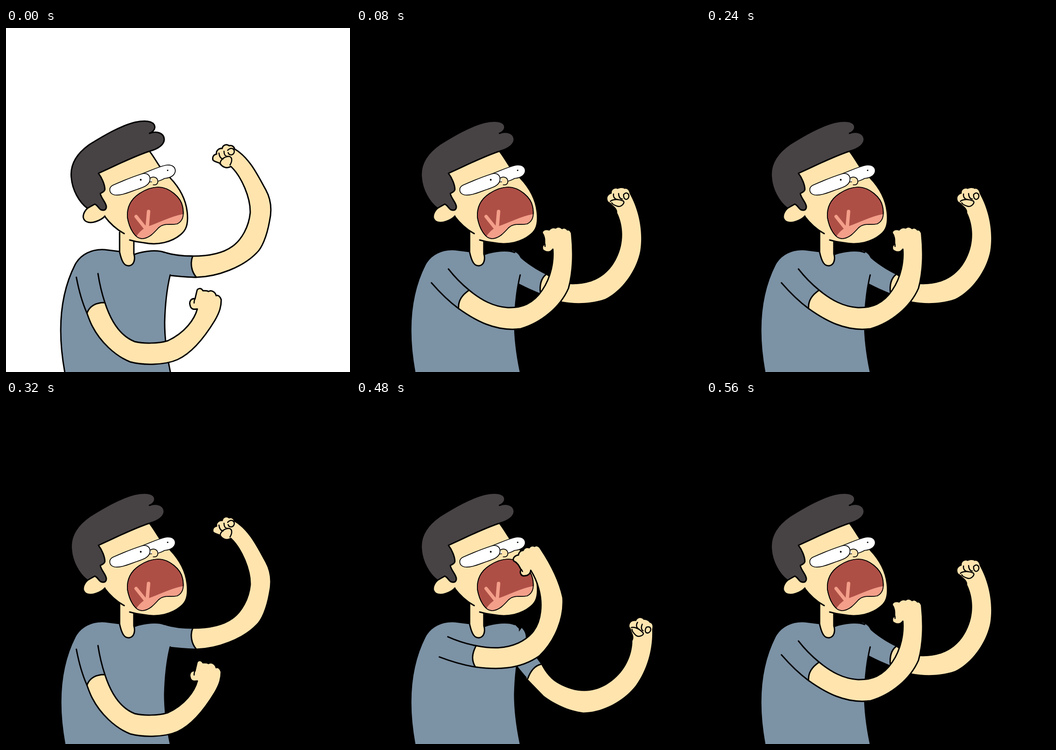
These frames come from a looping animation (748x748 px, 640 ms). An HTML page:

```html
<!DOCTYPE html>
<html lang="en">
<head>
<meta charset="utf-8">
<title>Shouting and punching</title>
<style>
  html, body { margin: 0; width: 100%; height: 100%; overflow: hidden; background: #fff; }
  svg { display: block; width: 100vw; height: 100vh; }
  path { stroke: #000; stroke-width: 3; stroke-linecap: round; stroke-linejoin: round; fill: none; }
  .skin { fill: #ffe4ae; }
  .shirt { fill: #7c92a5; }
  .hair { fill: #474244; }
  .white { fill: #fff; }
  .mouth { fill: #ae4f46; }
  .tongue { fill: #f39f8a; }
  .thin { stroke-width: 1.7; }
  .plain { stroke: none; }
  .fold { stroke: #f39f8a; stroke-width: 7.5; }
  .knuckles { stroke-width: 2.5; }
</style>
</head>
<body>
<svg viewBox="0 0 748 748">
  <defs>
    <path id="lips" d="M331 346 C355 346 380 368 384 388 C388 407 385 420 372 426 C355 429 345 423 332 434 C322 445 312 457 296 458 C280 458 268 435 264 412 C262 385 275 370 290 360 C305 350 318 346 331 346Z" style="fill: inherit; stroke-width: 1.7"/>
    <clipPath id="mouthClip"><use href="#lips"/></clipPath>
  </defs>

  <!-- Far arm -->
  <g class="back">
    <path class="skin" d="M395 496 L406 496 C440 496 470 491 492 475 C513 460 528 432 531 402 C532 370 513 324 489 301 C480 307 470 302 466 295 C461 291 454 292 450 287 C448 280 452 275 458 274 C456 267 463 261 470 262 C472 253 481 252 485 256 C491 254 496 258 497 263 C531 283 549 324 565 352 C577 374 578 398 573 420 C567 454 556 479 545 489 C515 520 460 541 414 542 L395 541Z"/>
    <path class="knuckles" d="M482 266 C490 258 498 263 496 271 C493 278 485 277 483 271 M474 268 C474 275 477 279 481 279 M463 272 C464 280 467 284 472 285 M466 297 C464 288 474 280 484 279 C493 280 492 290 487 298"/>
    <path class="shirt" d="M335 490 L345 488 C365 494 385 496 406 496 C400 511 403 530 414 542 C395 542 375 540 357 538 L335 538Z"/>
  </g>
  <g class="forward" id="farArm">
    <path class="skin plain" d="M401 532 L413 536 C430 549 450 557 466 557 C507 559 546 544 567 500 C583 468 582 430 568 402 C569 392 560 388 555 382 C552 378 548 379 547 374 C545 367 549 362 556 360 C555 351 563 347 569 350 C576 347 582 348 584 350 C590 348 594 354 595 360 C614 394 625 440 618 485 C610 526 580 570 542 589 C512 600 475 600 449 595 L398 577Z"/>
    <path class="knuckles" d="M560 361 C559 368 563 373 570 373 M571 360 C571 366 574 372 579 372 M582 362 C589 354 596 362 592 370 C587 376 581 371 582 362 M553 377 C560 371 574 373 581 376 C586 379 578 389 570 388 C563 386 558 384 556 380"/>
    <path class="shirt plain" d="M340 484 C353 489 355 495 358 500 C376 516 395 527 413 536 C402 545 399 560 401 577 C386 571 370 564 355 556 L330 545Z"/>
    <path d="M413 536 C402 545 399 560 401 577"/>
  </g>

  <!-- Body -->
  <path class="shirt plain" d="M130 760 C114 680 112 590 150 515 C162 492 187 480 215 482 L247 486 L280 492 C302 484 330 482 345 488 L354 497 L357 537 C349 570 346 600 345 640 C345 680 351 720 360 760Z"/>
  <path d="M130 760 C114 680 112 590 150 515 C162 492 187 480 215 482 L247 486 M280 492 C302 484 330 482 345 488 M357 537 C349 570 346 600 345 640 C345 680 351 720 360 760"/>

  <!-- Neck and face -->
  <path class="skin plain" d="M247 435 L247 487 C252 510 258 518 268 517 C280 515 281 500 278 488 L278 455Z"/>
  <path d="M247 444 L247 487 C252 510 258 518 268 517 C280 515 281 500 278 491 L278 465"/>
  <path class="skin plain" d="M195 312 L312 268 L334 302 L357 326 C377 347 391 373 394 400 C397 428 391 440 380 449 C360 466 330 473 300 467 L269 461 L250 450 L257 447 C240 438 226 425 214 409 L190 383Z"/>
  <path d="M312 268 C321 279 327 291 335 302 M357 326 C377 347 391 373 394 400 C397 428 391 440 380 449 C360 466 330 473 300 467 C289 466 279 464 269 461 M214 409 C226 425 240 438 257 447"/>
  <path class="skin" d="M192 383 C177 388 167 401 168 412 C171 425 186 424 195 421 C204 418 211 414 215 409"/>
  <path class="hair" d="M201 316 C237 300 275 280 312 268 C331 263 345 253 344 241 C343 229 329 223 312 229 C322 225 326 217 322 210 C315 200 295 202 280 205 C248 213 211 235 182 253 C155 272 139 296 142 325 C144 352 159 379 177 392 L193 383 C199 385 201 392 206 395 C214 398 219 395 218 387 C216 378 207 370 205 360 C207 358 214 357 215 351 C215 340 208 325 201 316Z"/>

  <!-- Eyes and nose -->
  <path class="white thin" d="M296 317 C312 311 335 300 350 298 C362 297 369 303 368 312 C366 322 355 326 345 327 C338 331 332 333 326 334 L305 335Z"/>
  <path class="white thin" d="M232 342 C250 334 280 322 296 317 C308 314 314 321 313 331 C311 342 300 346 285 351 C265 358 250 365 236 363 C223 360 223 347 232 342Z"/>
  <path class="skin thin" d="M314 326 C321 322 329 325 330 332 C331 339 326 342 320 341"/>
  <circle cx="293" cy="330" r="1.9"/>
  <circle cx="351.5" cy="309.5" r="1.6"/>

  <!-- Mouth -->
  <use href="#lips" class="mouth"/>
  <g clip-path="url(#mouthClip)">
    <path class="tongue plain" d="M390 404 C360 408 333 424 310 431 C298 436 290 443 283 454 L290 465 L390 465Z"/>
    <path class="fold" d="M283 410 L303 435 M310 399 L307 434"/>
  </g>
  <use href="#lips" fill="none"/>

  <!-- Near arm -->
  <g class="back">
    <path class="skin" d="M176 620 C182 637 184 642 188 649 C205 682 237 713 270 726 C300 734 346 733 373 721 C408 705 437 664 454 636 C465 617 468 605 468 591 C466 584 461 580 457 582 C455 574 447 569 440 573 C437 570 431 572 428 571 C424 564 416 566 415 572 L411 589 C403 587 398 594 400 602 C402 613 409 612 416 611 C410 633 390 662 352 680 C330 687 297 686 280 682 C244 668 225 628 215 597 C196 597 182 604 176 620Z"/>
    <path d="M153 542 C159 574 168 602 176 620 M200 534 C204 560 209 579 215 597"/>
    <path class="knuckles" d="M411 589 C409 592 409 595 409 598"/>
  </g>
  <g class="forward" id="nearArm">
    <path class="skin" d="M223 610 C258 635 303 661 358 654 C403 641 444 607 462 566 C472 530 473 490 469 450 C469 442 464 438 460 439 C456 434 451 434 448 436 C443 431 437 432 434 435 C428 432 422 436 420 439 C412 436 404 440 405 446 C411 454 410 462 410 470 C403 474 404 483 410 485 C417 489 424 487 428 481 C430 506 425 541 405 570 C385 600 360 609 330 608 C299 606 273 592 246 570 C230 581 222 593 223 610Z"/>
    <path d="M164 554 C184 577 204 596 223 610 M201 524 C215 542 230 557 246 570"/>
    <path class="knuckles" d="M411 470 L411 475"/>
  </g>
</svg>
<script>
  const STEP = 80, STEPS = 8;
  const nearArm = document.getElementById("nearArm");
  const farArm = document.getElementById("farArm");
  const start = performance.now();

  function show(name, visible) {
    for (const part of document.getElementsByClassName(name)) {
      part.style.display = visible ? "" : "none";
    }
  }

  // The arms swing back, middle, far end, middle; the shoulders are the pivots.
  function draw() {
    const step = Math.floor((performance.now() - start) / STEP) % STEPS;
    const phase = step % 4;
    const swing = phase === 2 ? 1 : 0;
    show("back", phase === 0);
    show("forward", phase !== 0);
    nearArm.setAttribute("transform", `rotate(${-28 * swing} 182 522)`);
    farArm.setAttribute("transform", `rotate(${26.5 * swing} 326 533)`);
    document.body.style.background = step === 0 ? "#fff" : "#000";
    requestAnimationFrame(draw);
  }
  draw();
</script>
</body>
</html>
```
